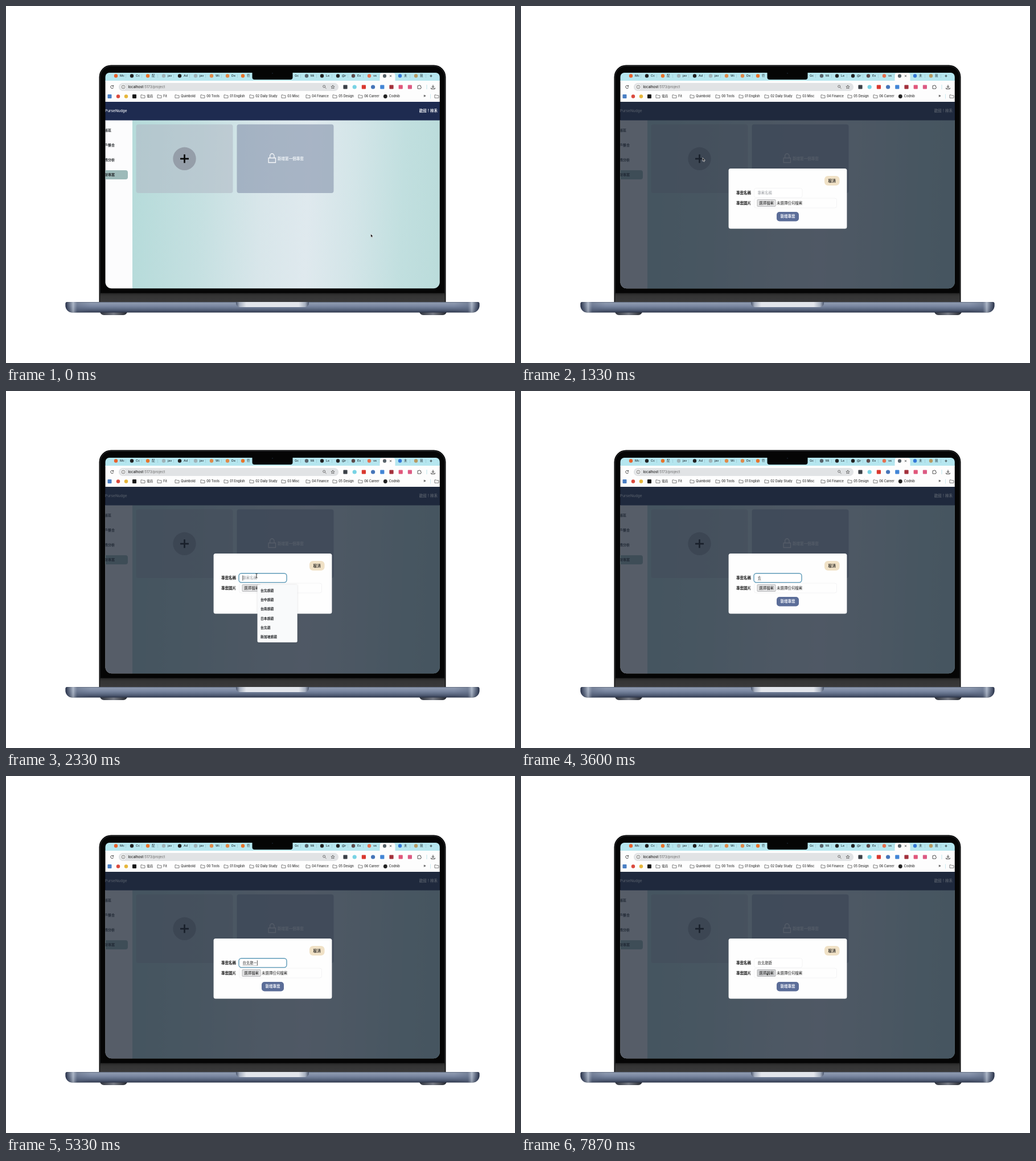
Recreate the animation shown at these times as an HTML page with a canvas. Size 894x626 px, loop 8 s.

```html
<!DOCTYPE html>
<html lang="zh-Hant">
<head>
<meta charset="utf-8">
<title>Project form on a laptop</title>
<style>
  html, body { margin: 0; width: 100%; height: 100%; overflow: hidden; background: #fff; }
  canvas { display: block; width: 894px; height: 626px; }
</style>
</head>
<body>
<canvas id="stage"></canvas>
<script>
const W = 894, H = 626, LOOP = 8000;
const canvas = document.getElementById('stage');
const c = canvas.getContext('2d');
const scale = window.devicePixelRatio || 1;
canvas.width = W * scale;
canvas.height = H * scale;
const FAMILY = 'Inter, "Noto Sans CJK TC", "Noto Sans CJK", sans-serif';

// ---------- helpers ----------
function box(x, y, w, h, r, fill, stroke, line = 1) {
  c.beginPath();
  c.roundRect(x, y, w, h, r);
  if (fill) { c.fillStyle = fill; c.fill(); }
  if (stroke) { c.strokeStyle = stroke; c.lineWidth = line; c.stroke(); }
}
function dot(x, y, r, fill) {
  c.beginPath();
  c.arc(x, y, r, 0, 7);
  c.fillStyle = fill;
  c.fill();
}
function text(s, x, y, size, color = '#222', weight = 400, align = 'left') {
  c.font = `${weight} ${size}px ${FAMILY}`;
  c.textAlign = align;
  c.textBaseline = 'middle';
  c.fillStyle = color;
  c.fillText(s, x, y);
}
function path(d, x, y, stroke, line, fill) {
  c.save();
  c.translate(x, y);
  const p = new Path2D(d);
  if (fill) { c.fillStyle = fill; c.fill(p); }
  if (stroke) { c.strokeStyle = stroke; c.lineWidth = line; c.stroke(p); }
  c.restore();
}
function gradient(x0, y0, x1, y1, ...stops) {
  const g = c.createLinearGradient(x0, y0, x1, y1);
  stops.forEach(([at, color]) => g.addColorStop(at, color));
  return g;
}
// Latest entry whose time has been reached.
const latest = (list, t) => list.filter(e => e[0] <= t).pop();

// ---------- laptop ----------
function laptop() {
  box(163.5, 103.5, 609, 418, [21, 21, 2, 2], '#050505');
  box(165.3, 105.3, 605.4, 416, [19.5, 19.5, 2, 2], null, '#2e3033', 1);
  box(165, 503.5, 606, 16, 0, gradient(0, 503, 0, 520, [0, '#242424'], [.3, '#343434'], [1, '#3b3b3c']));

  for (const x of [165, 726]) {
    box(x, 535, 48, 7, [0, 0, 12, 12],
      gradient(x, 0, x + 48, 0, [0, '#2c303a'], [.5, '#777b85'], [1, '#22252c']));
  }
  const shape = [3, 3, 12, 12];
  box(104.5, 519, 727, 18.5, shape, gradient(0, 519, 0, 537.5,
    [0, '#5c677c'], [.1, '#8f9bb0'], [.4, '#7986a0'], [.62, '#637089'], [.82, '#4b566e'], [1, '#2a3347']));
  box(104.5, 519, 727, 18.5, shape, gradient(105, 0, 831, 0,
    [0, '#273047'], [.008, '#4b556a99'], [.018, '#c3ccd9aa'], [.028, '#59657d66'], [.06, '#59657d00'],
    [.94, '#59657d00'], [.972, '#59657d66'], [.982, '#c3ccd9aa'], [.992, '#4b556a99'], [1, '#273047']));
  box(404, 519, 128, 9, [0, 0, 7, 7], gradient(404, 0, 532, 0,
    [0, '#48536a'], [.05, '#a6afbf'], [.14, '#e2e5eb'], [.86, '#e2e5eb'], [.95, '#a6afbf'], [1, '#48536a']));
}

// ---------- browser ----------
const TABS = [
  [193, 'Mc', '#e8622c'], [221, 'Cc', '#222'], [249, '配', '#e8752c'], [277, 'jav', '#9fb3b8'],
  [305, 'Ad', '#222'], [333, 'jav', '#9fb3b8'], [361, 'Wi', '#e08a4a'], [389, 'De', '#e08a4a'],
  [416, '符', '#e8752c'], [500, 'Gc', '#222'], [528, 'Mi', '#58636b'], [555, 'Le', '#222'],
  [583, '@r', '#222'], [610, 'Ex', '#5d4a4a'], [638, 've', '#e5704f'], [692, '未', '#3479d8'], [720, '我', '#b79a62']
];
const FOLDERS = [
  [237, '電商'], [266, 'Fit'], [297, 'Quimbold'], [342, '00 Tools'], [383, '01 English'],
  [428, '02 Daily Study'], [484, '03 Misc'], [527, '04 Finance'], [574, '05 Design'], [619, '06 Career'], [753, '']
];
const EXTENSIONS = ['#3b4147', '#78d3e4', '#d9382f', '#4675b9', '#4285d6', '#a3303b', '#e0567a', '#dc5a83'];

function browser() {
  c.fillStyle = '#b5e6ef';
  c.fillRect(174, 117, 588, 15);
  c.fillStyle = '#fdfdfd';
  c.fillRect(174, 131, 588, 37);
  for (const [x, label, color] of TABS) {
    if (x !== 500) dot(x, 122.5, 3.2, color);
    text(label, x + 7, 122.7, 5.4, '#27343a', 500);
    c.fillStyle = '#8fbcc7';
    c.fillRect(x + 17, 120, .5, 6);
  }
  box(656.5, 117.5, 27, 16, [4, 4, 0, 0], '#fdfdfd');
  dot(665, 122.7, 3.1, '#59636a');
  path('M-1.5-1.5L1.5 1.5M1.5-1.5L-1.5 1.5', 675.5, 122.7, '#222', .8);
  path('M-2.2 0H2.2M0-2.2V2.2', 746.5, 122.7, '#222', .8);

  path('M2 -1.8A2.6 2.6 0 1 0 2.5 .8M2.4-3V-1H.4', 186.3, 142, '#333', .9);
  box(198, 135, 386, 14, 7, '#e1e3e5');
  dot(206, 142, 4.6, '#fafafa');
  path('M3 0A3 3 0 1 1-3 0A3 3 0 1 1 3 0M0-.5V1.6M0-1.8V-1.1', 206, 142, '#444', .7);
  text('localhost', 214.5, 142.3, 6.2, '#222', 500);
  const hostWidth = c.measureText('localhost').width;
  text(':5173/project', 214.5 + hostWidth, 142.3, 6.2, '#666');
  path('M1.2-1A2 2 0 1 1-2.8-1A2 2 0 1 1 1.2-1M.7.6L3 2.9', 559.5, 142, '#555', .8);
  path('M0-3.2L.9-1L3.1-.9L1.4.6L2 2.8L0 1.6L-2 2.8L-1.4.6L-3.1-.9L-.9-1Z', 574, 142, '#444', .7);
  EXTENSIONS.forEach((color, i) => {
    const x = 596 + i * 16.2;
    if (i === 1 || i === 3) dot(x, 142, 3.6, color);
    else box(x - 3.6, 138.4, 7.2, 7.2, 1, color);
  });
  path('M-3-2H-1A1 1 0 0 1 1-2H2.5V0A1 1 0 0 1 2.5 2V3.2H-3Z', 726, 141.8, '#444', .9);
  c.fillStyle = '#bfe5ec';
  c.fillRect(738.5, 138, 1, 8);
  path('M0-3.5V1.2M-2-.8L0 1.2L2-.8M-3.3 1.5V3.3H3.3V1.5', 750, 142, '#333', 1);

  box(178.5, 155, 7, 7, 1, '#4a7fc4');
  dot(197, 158.5, 3.2, '#db4a3e');
  dot(211, 158.5, 3.2, '#e6b63a');
  box(222, 155, 7, 7, 1, '#161616');
  for (const [x, label] of FOLDERS) {
    path('M0-2.6H2.6L3.5-1.6H7V2.7H0Z', x, 158.5, '#555', .75);
    text(label, x + 10.3, 158.8, 5.5, '#333', 500);
  }
  dot(666.3, 158.5, 3.4, '#222');
  text('Codnib', 672.8, 158.8, 5.5, '#333', 500);
  text('»', 733, 158, 7, '#333', 600);
  c.fillStyle = '#bfe5ec';
  c.fillRect(745, 154.5, .8, 8);
}

// ---------- web page ----------
function page() {
  c.fillStyle = gradient(222, 330, 762, 350,
    [0, '#b6dbda'], [.22, '#c5e0e1'], [.42, '#d8e6ea'], [.57, '#dfe9ee'], [.72, '#d3e5e8'], [.88, '#c1dfdf'], [1, '#bbdcdb']);
  c.fillRect(222, 200, 540, 296);
  c.fillStyle = '#fcfcfd';
  c.fillRect(174, 200, 48, 296);
  box(160, 288, 54, 16, 4, '#9dbab9');
  [['記帳區', 185], ['帳戶整合', 191], ['財務分析', 191], ['理財專案', 191]].forEach(([label, right], i) =>
    text(label, right, 218.5 + i * 25.9, 6, '#25292c', 600, 'right'));

  box(228.5, 207.5, 170, 120.5, 4, '#b1b9c58c');
  box(405.5, 207.5, 170, 120.5, 4, '#8c9ab0a8');
  dot(313.5, 267.8, 20.2, '#959ea9');
  path('M-7.5 0H7.5M0-7.5V7.5', 313.5, 267.8, '#080808', 2.7);
  path('M-6.2-.5H6.2V7.5H-6.2ZM-3.7-.5V-4A3.7 4 0 0 1 3.7-4V-.5', 467.3, 267, '#f6f8fa', 1.3);
  text('新增第一個專案', 477, 268, 6.55, '#f0f4f7', 600);

  c.fillStyle = '#1e2b50';
  c.fillRect(174, 168, 588, 32.5);
  text('PurseNudge', 174, 184.5, 6.5, '#f1f3f7', 500);
  text('歡迎！林禾', 758, 184.5, 6.45, '#f1f3f7', 600, 'right');
}

// ---------- form ----------
const PLACES = ['台北旅遊', '台中旅遊', '台南旅遊', '日本旅遊', '台北遊', '新加坡旅遊'];
const OPENED = 1330, FOCUS = 2270, BLUR = 7730;
// time, typed text, number of suggestions
const TYPING = [
  [0, '', 0], [FOCUS, '', 6], [3130, 'ㄊ', 0], [4000, 'ㄊㄞ', 0], [4200, 'ㄊㄞˊ', 0], [4330, '台', 4],
  [4530, '台ㄅ', 0], [4800, '台北', 2], [5000, '台北ㄌ', 0], [5070, '台北ㄌㄩ', 0], [5200, '台北旅', 1],
  [5330, '台北旅ㄧ', 0], [5730, '台北旅ㄧㄡ', 0], [5930, '台北旅ㄧㄡˊ', 0], [6070, '台北旅遊', 0]
];

function form(t) {
  const [, typed, count] = latest(TYPING, t);
  const focused = t >= FOCUS && t < BLUR;
  box(364.6, 285, 207.8, 105.6, 3.5, '#fefefe');
  box(533, 298, 26.5, 16.8, 6, '#f0e1c6');
  text('取消', 546.2, 306.7, 6.6, '#33302c', 600, 'center');
  text('專案名稱', 378, 327.8, 6.5, '#111', 700);
  text('專案圖片', 378, 345.6, 6.5, '#111', 700);

  if (focused) box(409, 319.7, 84, 16, 4.5, '#fff', '#5d9ab8', 1.4);
  else box(409.5, 319.5, 84.5, 16.5, 3.5, '#fff', '#f0f0f1', .8);
  text(typed || '專案名稱', 415.5, 327.8, 6.35, typed ? '#222' : '#9a9da2', 500);
  const end = 415.5 + (typed ? c.measureText(typed).width : 0);
  if (typed && t < 6930) {
    c.fillStyle = '#66666699';
    c.fillRect(415.5, 332.2, end - 415.5, .6);
  }
  const caretOff = (t >= 2730 && t < 3130) || (t >= 3600 && t < 3930);
  if (focused && !caretOff) {
    c.fillStyle = '#222';
    c.fillRect(end, 323.3, .8, 9.2);
  }

  box(409.5, 337, 145, 17, 3.5, null, '#f0f0f1', .8);
  box(415, 339.6, 32, 11.8, 1, t > 7600 ? '#d2d3d5' : '#e6e6e7', '#9b9da0', .7);
  text('選擇檔案', 431, 345.7, 6.45, '#222', 500, 'center');
  text('未選擇任何檔案', 449, 345.7, 6.45, '#222', 500);
  box(449, 361, 39, 16.5, 5, '#5b6d98');
  text('新增專案', 468.5, 369.5, 6.5, '#f4f6fb', 600, 'center');

  if (count) suggestions(PLACES.filter(p => p.startsWith(typed)).slice(0, count));
}

function suggestions(items) {
  c.save();
  c.shadowColor = '#0002';
  c.shadowBlur = 3;
  box(441.5, 339.5, 70.2, items.length * 16.2 + 4, 2.5, '#f9fafb');
  c.restore();
  items.forEach((label, i) => text(label, 447, 350.2 + i * 16.2, 5.85, '#1c1e21', 600));
}

// ---------- pointer ----------
const TRACK = [
  [0, 640.5, 399.5], [70, 640.5, 399.5], [330, 560, 367], [600, 420, 308], [870, 332, 272], [1000, 319, 266],
  [1600, 319, 266], [1800, 424, 333], [2000, 424, 333], [2200, 440, 324], [7270, 440, 324], [7600, 431, 344], [LOOP, 431, 344]
];
const ARROW = 'M0 0V6.2L1.4 4.9L2.4 7.1L3.4 6.6L2.5 4.6H4.4Z';
const HAND = 'M-.5-1Q.2-1.8.8-1V2L3.8 2.7Q4.6 3 4.3 4.4L3.6 7H.3L-2 4Q-2 2.8-.5 3.8Z';
const IBEAM = 'M-1.6-3.6Q0-3.6 0-2.8Q0-3.6 1.6-3.6M0-2.8V2.8M-1.6 3.6Q0 3.6 0 2.8Q0 3.6 1.6 3.6';

function pointer(t) {
  if (t >= 3070 && t < 7270) return;
  const i = Math.max(1, TRACK.findIndex(p => p[0] > t));
  const [t0, x0, y0] = TRACK[i - 1], [t1, x1, y1] = TRACK[i];
  const k = (t - t0) / (t1 - t0);
  const x = x0 + (x1 - x0) * k, y = y0 + (y1 - y0) * k;
  if (t >= 930 && t < OPENED) path(HAND, x, y, '#222', .7, '#fff');
  else if (t >= 1730 && y < 337) path(IBEAM, x, y, '#222', .9);
  else path(ARROW, x, y, '#eee', .7, '#111');
}

// ---------- frame ----------
function draw(t) {
  c.setTransform(scale, 0, 0, scale, 0, 0);
  c.fillStyle = '#fff';
  c.fillRect(0, 0, W, H);
  laptop();
  c.save();
  c.beginPath();
  c.roundRect(174.5, 117, 587.3, 378.3, [7, 7, 11, 11]);
  c.clip();
  browser();
  page();
  if (t >= OPENED) {
    c.fillStyle = 'rgba(31,41,55,.75)';
    c.fillRect(174, 168, 588, 328);
    form(t);
  }
  pointer(t);
  c.restore();
  box(432.5, 114, 71, 15, [0, 0, 4, 4], '#050505');
  dot(468, 118, 1, '#17202b');
}
function tick() {
  draw(performance.now() % LOOP);
  requestAnimationFrame(tick);
}
tick();
</script>
</body>
</html>
```
